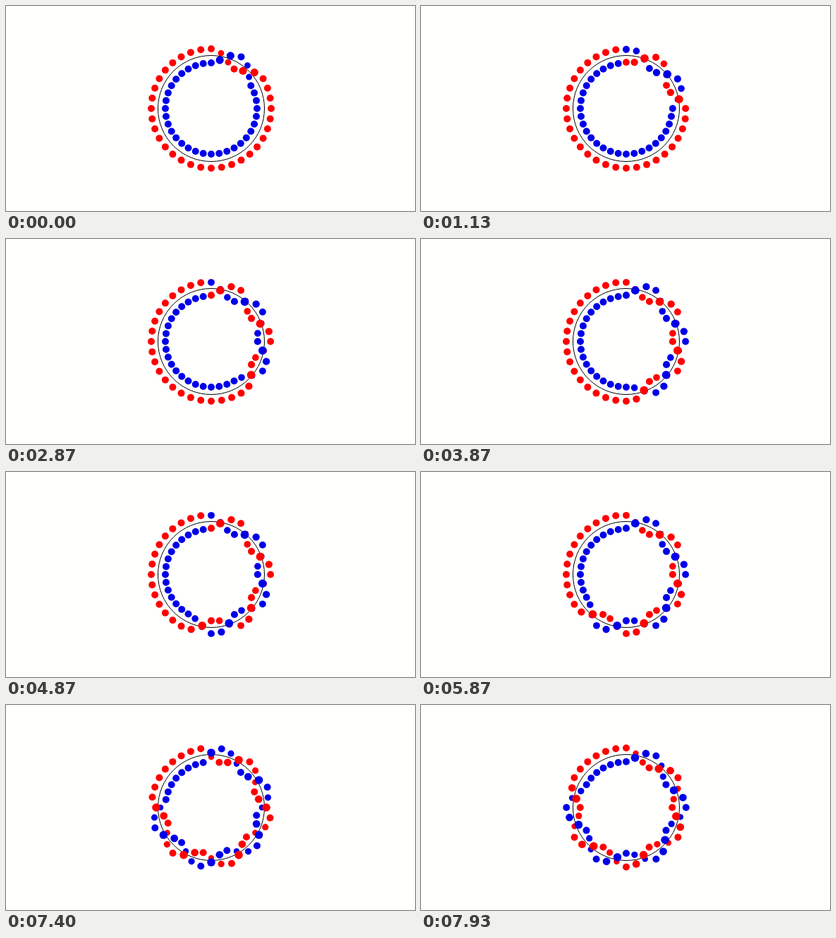
Recreate the animation shown at these times as an HTML page with a canvas. Size 580 by 292 pixels, loop 8000 ms.

```html
<!DOCTYPE html>
<html lang="en">
<head>
<meta charset="utf-8">
<title>Twisting ring</title>
<style>
  html, body { margin: 0; width: 100%; height: 100%; overflow: hidden; background: #fffffd; }
  canvas { display: block; width: 580px; height: 292px; }
</style>
</head>
<body>
<canvas id="stage"></canvas>
<script>
const WIDTH = 580, HEIGHT = 292;
const CENTER_X = 291, CENTER_Y = 146;
const RING = 75, STRAND = 10;
const PAIRS = 36, LAG = 60;
const FPS = 15, STEPS = 120, TURN_PER_STEP = 12, START_TURN = 360;
const RAD = Math.PI / 180;
const RED = '#f00', BLUE = '#0000e8', PAPER = '#fffffd';

const canvas = document.getElementById('stage');
const ctx = canvas.getContext('2d');
const scale = window.devicePixelRatio || 1;
canvas.width = WIDTH * scale;
canvas.height = HEIGHT * scale;
ctx.scale(scale, scale);

function bead(index, twist, color) {
  const angle = index * 360 / PAIRS * RAD;
  const radius = RING + STRAND * Math.cos(twist * RAD);
  return {
    x: CENTER_X + radius * Math.sin(angle),
    y: CENTER_Y - radius * Math.cos(angle),
    depth: Math.sin(twist * RAD),
    color
  };
}

// The top pair is wound steadily; each next pair follows with a fixed lag.
function beadsAt(turn) {
  const beads = [];
  for (let i = 0; i < PAIRS; i++) {
    const twist = Math.max(0, turn - i * LAG);
    beads.push(bead(i, twist, RED), bead(i, twist + 180, BLUE));
  }
  return beads.sort((a, b) => a.depth - b.depth);
}

// Size changes noticeably only where the strands cross.
function disc({ x, y, depth, color }) {
  ctx.fillStyle = color;
  ctx.beginPath();
  ctx.arc(x, y, 5 + 0.9 * depth ** 3, 0, 2 * Math.PI);
  ctx.fill();
}

function drawRing() {
  ctx.strokeStyle = '#000';
  ctx.lineWidth = 1;
  ctx.beginPath();
  ctx.arc(CENTER_X, CENTER_Y, RING + 0.5, 0, 2 * Math.PI);
  ctx.stroke();
}

function draw(step) {
  const beads = beadsAt(START_TURN + step * TURN_PER_STEP);
  ctx.fillStyle = PAPER;
  ctx.fillRect(0, 0, WIDTH, HEIGHT);
  beads.filter(b => b.depth < 0).forEach(disc);
  drawRing();
  beads.filter(b => b.depth >= 0).forEach(disc);
}

const start = performance.now();
function tick() {
  // The small offset keeps step changes on rounded 10 ms times.
  const elapsed = performance.now() - start + 4;
  draw(Math.floor(elapsed * FPS / 1000) % STEPS);
  requestAnimationFrame(tick);
}
tick();
</script>
</body>
</html>
```
